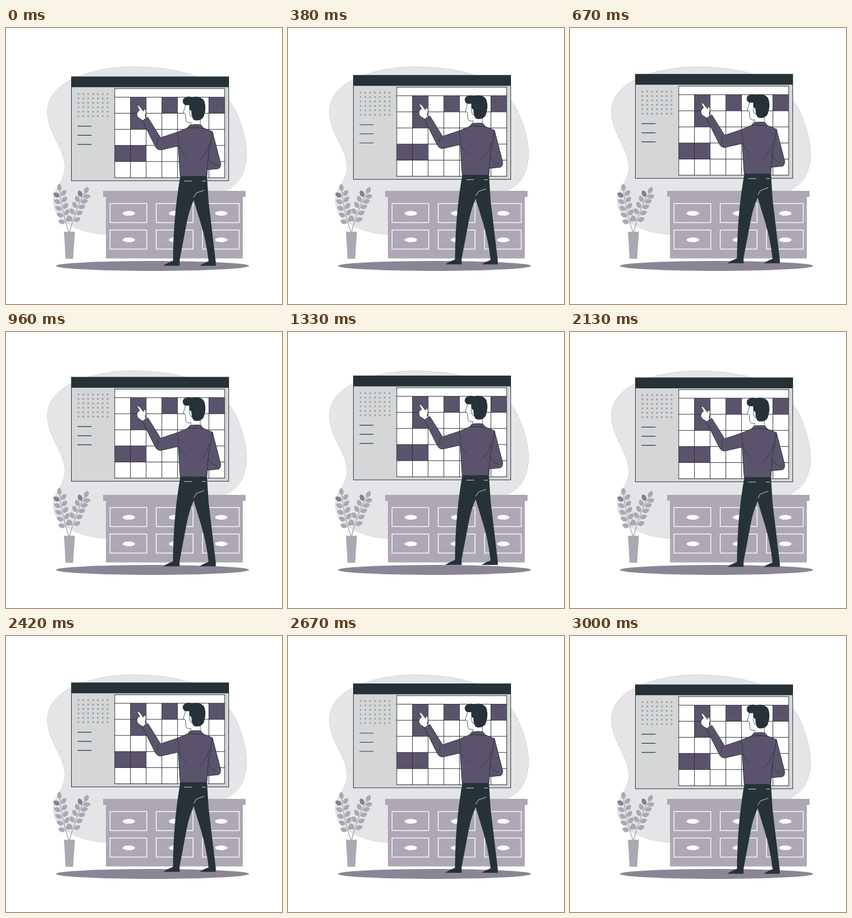
Animation, 500 px wide and 500 px high, one loop 3.04 s. Source, as an HTML page:

```html
<!DOCTYPE html>
<html lang="en">
<head>
<meta charset="utf-8">
<title>Planning board</title>
<style>
html, body { margin: 0; width: 100%; height: 100%; overflow: hidden; background: #fff; }
svg { display: block; width: 100%; height: 100%; }
.ink { fill: none; stroke: #263238; stroke-linecap: round; }
.dark { fill: #263238; }
.shirt { fill: #5b536c; stroke: #263238; stroke-linejoin: round; }
.skin { fill: #fff; stroke: #263238; stroke-width: .8; stroke-linejoin: round; }
.pale { fill: none; stroke: #fff; }
.thin { stroke-width: .8; }
</style>
</head>
<body>
<svg viewBox="0 0 500 500">
  <path fill="#e5e5e7" stroke="#bdbdc1" stroke-width=".5" d="M75 150C77 90 170 70 232 70C283 71 330 78 358 95C385 108 403 126 414 146C428 174 436 205 436 230C434 265 420 288 390 297L200 374C140 377 73 350 88 300C93 286 106 273 107 252C106 216 74 190 75 150Z"/>
  <ellipse cx="265.5" cy="431" rx="175" ry="9" fill="#8a8596"/>
  <path fill="#ada8b4" d="M176 295H434V306H429V417.500H181V306H176Z"/>
  <g id="drawers"></g>
  <g id="plant" fill="#aca7b3"><path d="M105 369H125L121.500 418H108Z"/></g>

  <g id="float">
    <rect x="118.500" y="88.500" width="285" height="188.500" fill="#d4d6d7" stroke="#263238"/>
    <path class="dark" d="M118 88.500H404V107.500H118Z"/>
    <g id="dots" fill="#959a9e"></g>
    <path class="ink" stroke-width="1.200" d="M130 178H154.500M130 194.500H154.500M130 211H154.500"/>
    <rect x="197" y="110" width="199" height="161.300" fill="#fff"/>
    <g id="cells" fill="#5b536c"></g>
    <path id="grid" class="ink"/>

    <path class="dark" d="M316 268H364L367 315L380 424V431H351Q356 427 367 423Q363 388 354 358L340 312Q332 330 328 350L314.500 421V431H285Q290 427 302.500 422Q303 340 316 268Z"/>
    <path class="pale thin" d="M323 277.500H337M355 277.500H362M359 294L345 299L340 307"/>

    <path class="shirt" d="M374 188L389 246Q389 253 385 255L365 257L360 230Z"/>
    <path class="shirt" d="M329 181L310 189L280 199L257 162L247 168L270 214Q274 222 281 221L312 214L315.500 269H364L366 236L374 188L357 181Z"/>
    <path class="ink thin" d="M310 190Q314 201 313 214Q317 224 326 232M368 210Q364 229 349 241M366 234Q370 246 382 249M277 200Q273 205 275 212"/>

    <path class="skin" d="M325 137L324 145L321 153L325 156L326 168Q327 172 335 171V177H352V160L344 137Z"/>
    <path class="dark" d="M326 140C319 139 318 128 325 126Q331 123 337 126C347 122 359 127 360 135Q363 146 359 158C357 167 347 169 341 167Q336 164 336 150L332 148V140Z"/>
    <path class="skin" d="M336 150C332 147 331 151 333 155Q334 162 337 160Z"/>
    <path class="shirt" d="M329 181L333 176Q344 174 353 175.500L358 182Q343 179 329 181Z"/>
    <path class="skin" d="M248 168L239 162Q234 154 242 149L238 142Q239 139 242 142L249 151L250 147Q256 147 252 161L254 163Z"/>
  </g>
</svg>
<script>
const $ = id => document.getElementById(id);
const range = n => [...Array(n).keys()];
const add = (id, html) => $(id).insertAdjacentHTML('beforeend', html);

for (const c of range(3)) for (const r of range(2)) {
  add('drawers', `<g transform="translate(${188.5 + c * 83.75} ${318 + r * 48})">
    <rect class="pale" width="66.5" height="34.5" stroke-width="1.4"/>
    <ellipse cx="34" cy="17.7" rx="11.3" ry="4.3" fill="#fff"/></g>`);
}

for (const c of range(7)) for (const r of range(6)) {
  add('dots', `<circle cx="${131.2 + c * 8.8}" cy="${119.8 + r * 8}" r="1.6"/>`);
}

// Calendar
const colX = c => 197 + c * 28.43;
const rowY = r => 125.5 + r * 29.16;
function mark(c, r, cols = 1, rows = 1) {
  add('cells', `<path d="M${colX(c)} ${rowY(r)}H${colX(c + cols)}V${rowY(r + rows)}H${colX(c)}Z"/>`);
}
mark(1, 0, 1, 2);
mark(3, 0);
mark(6, 0);
mark(0, 3, 2);
$('grid').setAttribute('d', 'M197 110H396' +
  range(6).map(r => `M197 ${rowY(r)}H396`).join('') +
  range(8).map(c => `M${colX(c)} ${c % 7 ? rowY(0) : 110}V271.3`).join(''));

// A curved stem with a leaf at its tip and pairs of leaves below
function branch(tip, bend, root) {
  const at = u => tip.map((p, i) => p * (1 - u) ** 2 + 2 * bend[i] * u * (1 - u) + root[i] * u * u);
  const leaf = (u, side, fill = '#aca7b3') => {
    const [x, y] = at(u), [x2, y2] = at(u + .05);
    const lean = Math.atan2(x - x2, y2 - y) * 180 / Math.PI + side * 52;
    add('plant', `<path fill="${fill}" transform="translate(${x} ${y}) rotate(${lean})"
      d="M0 -2C-6 -5 -5 -12 0 -15C5 -12 6 -5 0 -2Z"/>`);
  };
  add('plant', `<path fill="none" stroke="#aca7b3" stroke-width="1.5" d="M${tip}Q${bend} ${root}"/>`);
  leaf(.08, 0);
  for (const i of range(5)) {
    leaf(.2 + i * .15, -1, i ? undefined : '#858091');
    leaf(.18 + i * .15, 1);
  }
}
branch([97, 291], [100, 330], [114, 370]);
branch([144, 297], [128, 322], [115, 370]);

// Steady rise and fall with a short rest before the loop restarts
const LOOP = 3040, SWING = 3000, PHASE = 30, RISE = 10;
function draw() {
  const t = Math.min(performance.now() % LOOP, SWING) + PHASE;
  const lift = RISE * (1 - Math.abs(t % SWING / SWING * 2 - 1));
  $('float').setAttribute('transform', `translate(0 ${-lift})`);
  requestAnimationFrame(draw);
}
draw();
</script>
</body>
</html>
```
